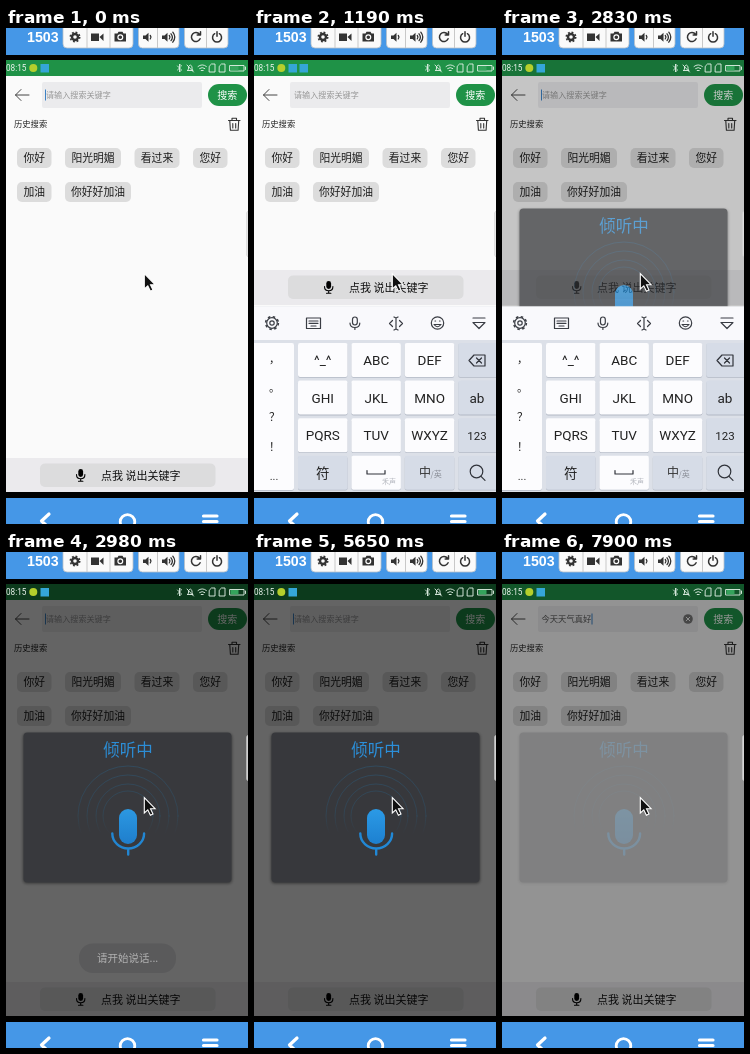
Write an HTML page that moves like this. It is 242 px wide and 496 px high and loops after 8 s.

```html
<!DOCTYPE html>
<html lang="zh-CN">
<head>
<meta charset="utf-8">
<title>语音搜索</title>
<style>
  html, body { margin: 0; width: 100%; height: 100%; overflow: hidden; background: #000; }
  svg { display: block; width: 242px; height: 496px; }
  text { font-family: "Noto Sans CJK SC", "Noto Sans CJK", "Noto Sans", sans-serif; }
  .latin { font-family: Roboto, Arial, sans-serif; }
  .line { fill: none; stroke-linecap: round; stroke-linejoin: round; }
</style>
</head>
<body>
<svg id="stage" viewBox="0 0 242 496" xmlns="http://www.w3.org/2000/svg">
  <defs>
    <linearGradient id="micFill" x1="0" y1="0" x2="0" y2="1">
      <stop offset="0" stop-color="#2b9ae6"/><stop offset="1" stop-color="#1d80d0"/>
    </linearGradient>
    <linearGradient id="wave" gradientUnits="userSpaceOnUse" x1="0" y1="231" x2="0" y2="290">
      <stop offset="0" stop-color="#38a0e6"/><stop offset=".5" stop-color="#2b86c6"/>
      <stop offset=".85" stop-color="#2b86c6" stop-opacity="0"/>
    </linearGradient>
    <linearGradient id="idle" gradientUnits="userSpaceOnUse" x1="0" y1="214" x2="0" y2="282">
      <stop offset="0" stop-color="#2a6084" stop-opacity=".45"/>
      <stop offset=".7" stop-color="#2a5878" stop-opacity=".35"/>
      <stop offset="1" stop-color="#2a5878" stop-opacity="0"/>
    </linearGradient>
    <filter id="soft" x="-10%" y="-10%" width="120%" height="120%"><feGaussianBlur stdDeviation="1.5"/></filter>
  </defs>

  <g id="screen">
    <rect y="31" width="242" height="434" fill="#fafafa"/>
    <rect y="31" width="242" height="17" fill="#1f9247"/>
    <path class="line" d="M23 67H9.500M15 61.500L9.500 67l5.500 5.500" stroke="#444" stroke-width="1"/>
    <rect x="36" y="54" width="160" height="26" rx="2" fill="#ebebed"/>
    <rect x="202" y="56" width="39" height="22" rx="11" fill="#1f9247"/>
    <g class="line" stroke="#333" stroke-width="1.100">
      <path d="M222.500 92.500h11.500M226 92v-1.800h4.500V92M223.800 93l.6 9.200h7.700l.6-9.200M226.800 95.500v4.500M229.700 95.500v4.500"/>
    </g>
    <g id="typed">
      <circle cx="186" cy="67" r="4.800" fill="#777"/>
      <path class="line" d="M184.200 65.200l3.600 3.600m0-3.600l-3.600 3.600" stroke="#f5f5f5" stroke-width="1"/>
      <path d="M90 61.500v11" stroke="#3d82c4"/>
    </g>
    <path id="caret" d="M39.500 61.500v11" stroke="#3d82c4"/>
    <g id="bar">
      <rect y="430" width="242" height="35" fill="#ebeaed"/>
      <rect x="34" y="435.500" width="175.500" height="23.500" rx="5" fill="#dcdcdd"/>
      <rect x="72.300" y="441" width="4.800" height="8" rx="2.400"/>
      <path class="line" d="M70.500 446.500q0 4.300 4.200 4.300t4.200-4.300M74.700 451v2.300M72.500 453.300h4.400" stroke="#000" stroke-width="1.100"/>
    </g>
  </g>

  <rect id="dim" y="31" width="242" height="434"/>

  <g id="status">
    <circle cx="27.300" cy="40" r="4" fill="#b5cf2c"/>
    <rect x="34.500" y="36" width="8.500" height="8.500" fill="#35a6d8"/>
    <rect id="input" x="45.500" y="36" width="8.500" height="8.500" fill="#35a6d8"/>
    <g class="line" stroke="#e4f2e8" stroke-width=".9">
      <path d="M171.500 38l4 4-2 2v-8l2 2-4 4"/>
      <path d="M181.500 42.500h5.500l-1-1.500v-2.500q-1.700-3-3.500 0v2.500zM181 37l6.500 7"/>
      <path d="M192 38.500q4.200-3.400 8.400 0M193.600 40.500q2.600-2 5.200 0M195.200 42.500h2"/>
      <path d="M203.500 38l2-2h3.500v8h-5.500zM213.500 38l2-2h3.500v8h-5.500z"/>
      <path d="M224 37.500h14v5.500h-14zM239.500 39v2.500"/>
    </g>
    <rect x="224.500" y="38" width="8" height="4.500" fill="#35a45c"/>
  </g>

  <g id="dialog">
    <rect x="17" y="181.500" width="209" height="150" rx="4" opacity=".45" filter="url(#soft)"/>
    <rect x="17.500" y="180.500" width="208" height="150" rx="4" fill="#37383c"/>
    <g id="rings" class="line"></g>
    <rect x="113" y="257" width="18" height="35" rx="9" fill="url(#micFill)"/>
    <path class="line" d="M106.300 281.500a15.900 15 0 0 0 31.800 0M122.200 297v5.500" stroke="#2188d6" stroke-width="2.400"/>
  </g>

  <g id="toast">
    <rect x="73" y="391.500" width="97" height="29.500" rx="14" fill="#555557"/>
  </g>

  <g id="keyboard">
    <rect y="278.500" width="242" height="187" fill="#dce0e8"/>
    <rect y="278.500" width="242" height="33.500" fill="#f9f9fc"/>
    <g class="line" stroke="#3a3d44" stroke-width="1.200">
      <circle cx="18" cy="295" r="5.300"/>
      <circle cx="18" cy="295" r="6.400" stroke-width="1.500" stroke-linecap="butt" stroke-dasharray="2.500 2.527"/>
      <circle cx="18" cy="295" r="2.200"/>
      <path d="M52.500 290h14v10.500h-14zM55 293h9M55 295.300h9M57 298h5"/>
      <rect x="98.500" y="289" width="4.800" height="8" rx="2.400"/>
      <path d="M96 295q0 4.500 4.900 4.500t4.900-4.500M100.900 299.500v2"/>
      <path d="M142 290v11M140 289l2 1 2-1M140 302l2-1 2 1M138.500 292.500l-3 3 3 3M145.500 292.500l3 3-3 3"/>
      <circle cx="183.500" cy="295" r="6.200"/>
      <path d="M180 296.500q3.500 4.500 7 0zM181 293h.6M185.500 293h.6"/>
      <path d="M219 290h12M219 294.500h12l-6 6z"/>
    </g>
    <g id="keys"></g>
    <g class="line" stroke="#30333a" stroke-width="1.200">
      <path d="M215 332.500l5-5.500h11v11h-11zM222.500 330l5 5m0-5l-5 5"/>
      <path d="M113 442.500v3.500h18v-3.500"/>
      <circle cx="222.500" cy="443.500" r="6.300"/><path d="M227 448.300l4 4"/>
    </g>
  </g>

  <rect x="240.300" y="183" width="8" height="46" rx="3" fill="#e2e2e2" stroke="#ccc" stroke-width=".6" opacity=".85"/>

  <g id="frame">
    <rect width="242" height="27" fill="#4597e7"/>
    <rect y="27" width="242" height="5"/>
    <rect y="464" width="242" height="6"/>
    <rect y="470" width="242" height="26" fill="#4597e7"/>
    <g id="tools"></g>
    <g fill="#333">
      <circle cx="69" cy="9" r="3" fill="none" stroke="#333" stroke-width="2.400"/>
      <circle cx="69" cy="9" r="4.700" fill="none" stroke="#333" stroke-width="1.600" stroke-dasharray="1.850 1.840"/>
      <path d="M85 5.500h8v7.500h-8zM93.500 9l4-3.500v7.500z"/>
      <path d="M108.500 5.500h3l1-1.800h4l1 1.800h2.500v8h-11.500z"/>
      <path d="M137 7.500h2.500l3-2.800v9l-3-2.800H137zM156 7.500h2.500l3-2.800v9l-3-2.800H156z"/>
    </g>
    <circle cx="114.300" cy="9.300" r="2.400" fill="#333" stroke="#fff" stroke-width="1.200"/>
    <g class="line" stroke="#333" stroke-width="1.300">
      <path d="M144.300 7.500q1.400 1.700 0 3.400M163.300 7.500q1.400 1.700 0 3.400M165 5.800q2.800 3.400 0 6.800M166.800 4.200q4 5 0 10"/>
      <path d="M193.500 6.300a4.500 4.500 0 1 0 .6 4.500M194.500 3.800v3.200h-3.300" stroke-width="1.500"/>
      <path d="M208.700 5.700a4.500 4.500 0 1 0 4.700 0M211 3.800v4.500" stroke-width="1.500"/>
    </g>
    <g class="line" stroke="#fff" stroke-width="3.200">
      <path d="M43 486l-7.500 7 7.500 7M197.500 488h13.500M197.500 493.500h13.500"/>
      <circle cx="121.500" cy="494" r="7.300" stroke-width="2.800"/>
    </g>
  </g>
  <path d="M138.300 245.500v15.500l3.500-3.200 2.600 5.400 2.600-1.200-2.500-5.300h4.600z" fill="#111" stroke="#fff" stroke-width="1.100"/>
</svg>
<script>
const LOOP = 8000;
const $ = id => document.getElementById(id);

function add(parent, tag, attrs, label) {
  const el = document.createElementNS("http://www.w3.org/2000/svg", tag);
  for (const k in attrs) el.setAttribute(k, attrs[k]);
  if (label) el.textContent = label;
  return parent.appendChild(el);
}
// Text centred vertically on cy
function write(parent, label, x, cy, size, fill, more = {}) {
  return add(parent, "text", { x, y: cy + size * 0.37, "font-size": size, fill, ...more }, label);
}
const mid = { "text-anchor": "middle" };
const latin = { ...mid, class: "latin" };

const screen = $("screen");
write($("status"), "08:15", 0, 40.3, 8.2, "#eef6f0", { class: "latin" });
write(screen, "搜索", 221.3, 67, 10, "#fff", mid);
write(screen, "历史搜索", 8, 96.3, 8.3, "#222");
const hint = write(screen, "请输入搜索关键字", 40, 67, 8.1, "#979797");
write($("typed"), "今天天气真好", 39.5, 67, 8.3, "#555");

[["你好", 11, 120, 34.5], ["阳光明媚", 59, 120, 56], ["看过来", 128.5, 120, 45], ["您好", 187, 120, 34.5],
 ["加油", 11, 154, 34.5], ["你好好加油", 59, 154, 66]].forEach(([word, x, y, width]) => {
  add(screen, "rect", { x, y, width, height: 20, rx: 5, fill: "#dcdcdc" });
  write(screen, word, x + width / 2, y + 10.2, 10.8, "#1c1c1c", mid);
});
write($("bar"), "点我 说出关键字", 95, 447.5, 11, "#111");
write($("dialog"), "倾听中", 122, 198.3, 16.5, "#2b8fd9", mid);
write($("toast"), "请开始说话...", 91, 406.3, 10.5, "#dcdcdc");

const ring = (r, stroke, width) =>
  add($("rings"), "circle", { cx: 122, cy: 264, r, stroke, "stroke-width": width });
[25, 32, 41, 50].forEach(r => ring(r, "url(#idle)", 1));
const waves = [17, 25, 32].map((r, i) => ring(r, "url(#wave)", 0.9 + i * 0.2));

// Keyboard
const keys = $("keys");
function key(x, y, width, height, fill) {
  add(keys, "rect", { x, y: y + 0.8, width, height, rx: 2, fill: "#b4bac6" });
  add(keys, "rect", { x, y, width, height, rx: 2, fill });
}
key(-3, 315, 43, 147, "#fcfcfe");
[["，", 331], ["。", 360], ["？", 389], ["！", 419]].forEach(([s, y]) => write(keys, s, 15, y, 11, "#222"));
write(keys, "...", 20, 448, 11, "#222", latin);
const rows = [["^_^", "ABC", "DEF", ""], ["GHI", "JKL", "MNO", "ab"], ["PQRS", "TUV", "WXYZ", "123"], ["符", "", "", ""]];
rows.forEach((row, r) => row.forEach((label, c) => {
  const x = 44 + c * 53.4, y = 315 + r * 37.6;
  const grey = c === 3 || (r === 3 && c !== 1);
  key(x, y, 49.5, 34, grey ? "#d6dce7" : "#fcfcfe");
  const size = label === "123" ? 11.5 : 13.5;
  if (label) write(keys, label, c === 3 ? 223 : x + 24.8, y + 17.3, size, "#222", r === 3 ? mid : latin);
}));
write(keys, "禾声", 128, 453.5, 7, "#b4b7be");
write(keys, "中", 165, 444.5, 12, "#333");
write(keys, "/英", 176.5, 446, 8, "#8a8e97");

// Emulator toolbar
write($("frame"), "1503", 21, 8.8, 14.2, "#fff", { "font-weight": 700, style: "font-family:Arial,sans-serif" });
[[57, 81, 104, 127], [132.5, 151.5, 173], [178.5, 200.5, 222]].forEach(xs => {
  const x = xs[0], width = xs[xs.length - 1] - x;
  add($("tools"), "rect", { x, y: -6, width, height: 26, rx: 4, fill: "#fafafa", stroke: "#b9c0c8", "stroke-width": 0.8 });
  xs.slice(1, -1).forEach(d => add($("tools"), "path", { d: `M${d} 0v20`, stroke: "#c8c8c8" }));
});

// Each step [time, value] holds until the next one
function play(el, prop, steps) {
  const frames = steps.map(([t, v]) => ({ offset: t / LOOP, [prop]: v, easing: "step-end" }));
  frames.push({ offset: 1, [prop]: steps[steps.length - 1][1] });
  return el.animate(frames, { duration: LOOP, iterations: Infinity });
}
const shift = y => `translate(0px, ${y}px)`;

const anims = [
  play($("caret"), "opacity", [[0, 1], [140, 0], [740, 1], [1190, 0], [1790, 1], [2240, 0], [2830, 1], [6850, 0]]),
  play(hint, "opacity", [[0, 1], [6850, 0]]),
  play($("typed"), "opacity", [[0, 0], [6850, 1]]),
  play($("input"), "opacity", [[0, 0], [740, 1], [2830, 0]]),
  play($("bar"), "transform", [[0, shift(0)], [740, shift(-188)], [2980, shift(0)]]),
  play($("keyboard"), "opacity", [[0, 0], [740, 0.85], [890, 1], [2980, 0]]),
  play($("keyboard"), "transform", [[0, shift(0)], [740, shift(14)], [890, shift(0)]]),
  play($("dim"), "opacity", [[0, 0], [2830, 0.21], [2980, 0.6], [7900, 0.41]]),
  play($("dialog"), "opacity", [[0, 0], [2830, 0.68], [2980, 0.97], [3120, 1], [7900, 0.2]]),
  play($("toast"), "opacity", [[0, 0], [2980, 0.65], [3120, 1], [4920, 0.9], [5070, 0.4], [5220, 0]]),
  play(waves[0], "opacity", [[0, 0], [4920, 1], [5220, 0], [5360, 1], [5650, 0], [5950, 1], [6100, 0]]),
  play(waves[1], "opacity", [[0, 0], [4920, 1], [5220, 0], [5360, 1], [5510, 0], [5950, 1], [6100, 0]]),
  play(waves[2], "opacity", [[0, 0], [4920, 1], [5220, 0], [5360, 1], [5510, 0]])
];
const start = document.timeline.currentTime || 0;
anims.forEach(a => { a.startTime = start; });
</script>
</body>
</html>
```
